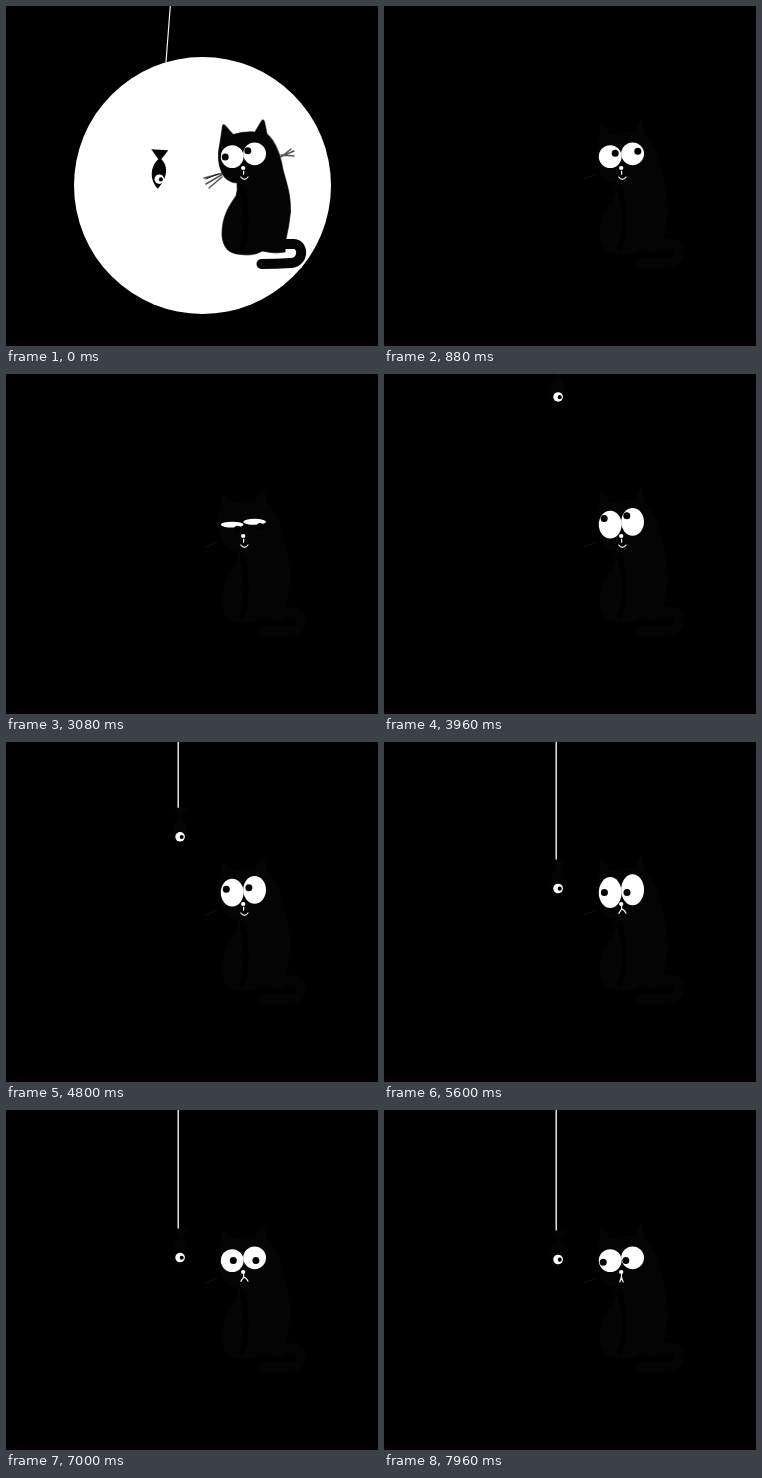
An HTML page with a canvas for the animation above (8 s loop, 372x340 px).

```html
<!DOCTYPE html>
<html lang="en">
<head>
<meta charset="utf-8">
<title>Cat in the dark</title>
<style>
  html, body { margin: 0; width: 100%; height: 100%; overflow: hidden; background: #000; }
  canvas { display: block; }
</style>
</head>
<body>
<canvas id="stage" width="372" height="340"></canvas>
<script>
const ctx = document.getElementById('stage').getContext('2d');
const LOOP = 8000, STEP = 40;
const SHADE = '#040404', PALE = '#f4f4f4';

const BLINKS = [640, 1800, 2920, 6280];
// Gaze relative to the point between the eyes; tilt lowers the left pupil and raises the right.
const LOOKS = [
  { from: 0, x: -6.9, y: -1.3, tilt: 3.2 },
  { from: 720, x: 5.1, y: -3, tilt: 1 },
  { from: 1240, x: -3.6, y: 4.4, tilt: 1.4 },
  { from: 2480, x: 5.4, y: 4.7, tilt: 1.4 },
  { from: 3600, x: -5.9, y: -6, tilt: 1.4 },
  { from: 4440, x: -5.7, y: 1.3, tilt: 0, time: 800 },
  { from: 6360, x: 1.2, y: 1.3, tilt: 0 },
  { from: 7240, x: -6.9, y: 2.2, tilt: 0.9 }
];

const BODY = new Path2D(`M214 137 L216.5 120 Q217.5 117 219.5 120 L227 128.5 Q238 125 249 126
  L255.5 115 Q257.5 112.5 258.5 116 L261 128 C270 136 275 151 277 164 C281 178 285 190 284.5 206
  Q283 220 280 233 L279 246 Q268 248 256 245 Q248 250 235 248.5 C223 248 217 242 216 229
  C216 210 223 200 230 190 Q232 184 231 177 Q220 176 216 167 C211 156 212 146 214 137 Z`);
const TAIL = new Path2D('M275 238 H288 C298 238.5 298 256 285 257 Q270 258 255.5 258');
const CHEST = new Path2D('M236 182 C241 200 242 225 236 242');
const WHISKERS = new Path2D(`M217 167 L198 172 M217 168 L200 178 M216 171 L203 182
  M274 151 L288 145 M275 149 L288 150 M275 151 L285 143`);
const FAINT_WHISKER = new Path2D('M212 168 L200 173');
const FISH = new Path2D(`M-8 -30 L9 -29 L2 -20 C8 -15 10 -3 -1.5 9.5
  C-11 -1 -8 -14 -1 -20 Z`);
const MOUTHS = {
  smile: new Path2D('M237.6 165 V168.2 M234.8 171 Q238.4 175.6 242 171'),
  frown: new Path2D('M237.6 163 V167 M234.8 171.3 L237.6 167.2 Q240 167.5 242 171.3'),
  small: new Path2D('M237.5 163 V167 M235.8 172 L237.4 167 L239.2 172 M236.6 169.6 H238.4')
};

const ramp = (t, from, to) => Math.min(1, Math.max(0, (t - from) / (to - from)));
const mix = (a, b, k) => a + (b - a) * k;

function oval(x, y, rx, ry, color) {
  ctx.fillStyle = color;
  ctx.beginPath();
  ctx.ellipse(x, y, rx, ry, 0, 0, Math.PI * 2);
  ctx.fill();
}

function fill(path, color) {
  ctx.fillStyle = color;
  ctx.fill(path);
}

function trace(path, color, width) {
  ctx.strokeStyle = color;
  ctx.lineWidth = width;
  ctx.stroke(path);
}

function line(x1, y1, x2, y2, width) {
  const path = new Path2D();
  path.moveTo(x1, y1);
  path.lineTo(x2, y2);
  trace(path, PALE, width);
}

// Origin is the middle of the eye.
function fish(x, y) {
  ctx.save();
  ctx.translate(x, y);
  fill(FISH, SHADE);
  oval(0, 0, 4.8, 4.8, '#fff');
  oval(1.6, 0.2, 2, 2.1, '#000');
  ctx.restore();
}

function spotlight(t) {
  const alpha = 1 - ramp(t, 0, 200);
  if (alpha === 0) return;
  ctx.globalAlpha = alpha;
  line(164.3, 0, 160, 56, 1.2);
  oval(196.5, 179.5, 128.5, 128.5, '#fff');
  fish(153.3, 173.2);
  trace(WHISKERS, '#555', 1.5);
  trace(BODY, '#666', 1.2);
  ctx.globalAlpha = 1;
}

function gaze(t) {
  const i = LOOKS.findLastIndex(look => look.from <= t);
  const next = LOOKS[i], last = LOOKS[Math.max(0, i - 1)];
  const k = ramp(t, next.from, next.from + (next.time || 2 * STEP));
  return {
    x: mix(last.x, next.x, k),
    y: mix(last.y, next.y, k),
    tilt: mix(last.tilt, next.tilt, k)
  };
}

function lid(t) {
  const start = BLINKS.find(b => t >= b && t < b + 6 * STEP);
  if (start === undefined) return 1;
  const phase = (t - start + STEP) / (7 * STEP);
  return Math.abs(1 - 2 * phase) ** 1.6;
}

function eyes(t) {
  const wide = 2.5 * ramp(t, 3640, 3840) + 1.6 * ramp(t, 5280, 5440) - 4.1 * ramp(t, 5800, 6000);
  const ry = (11.4 + wide) * lid(t);
  const look = gaze(t);
  for (const side of [-1, 1]) {
    oval(237.4 + side * 11.2, 149.2 - side * 1.4, 11.4, ry, '#fff');
    oval(237.4 + side * 11.3 + look.x, 149.2 - side * look.tilt + look.y, 3.5, 3.5, '#000');
  }
}

function cat(t) {
  fill(BODY, SHADE);
  trace(TAIL, SHADE, 10);
  trace(CHEST, '#000', 5);
  trace(FAINT_WHISKER, '#111', 1);
  eyes(t);
  oval(237.2, 162, 2.2, 2.1, '#fff');
  const mood = t < 4840 ? 'smile' : t < 7480 ? 'frown' : 'small';
  trace(MOUTHS[mood], PALE, 1.2);
}

// Steady drop, then a slowing one, then a gentle sag of the string.
function hangingFish(t) {
  if (t < 3600) return;
  const slow = 1 - (1 - ramp(t, 4400, 5600)) ** 1.5;
  const y = -3 + 54.5 * ramp(t, 3560, 4400) + 95 * slow + 3 * ramp(t, 5600, 7960) ** 2;
  fish(174.1, y);
  if (y > 29.5) line(172.2, 0, 172.2, y - 29.5, 1.4);
}

function draw(t) {
  ctx.fillStyle = '#000';
  ctx.fillRect(0, 0, 372, 340);
  ctx.fillStyle = '#070003';
  ctx.fillRect(0, 336, 372, 4);
  ctx.lineCap = 'round';
  ctx.lineJoin = 'round';
  spotlight(t);
  cat(t);
  hangingFish(t);
}

const begin = performance.now();
function frame() {
  const t = (performance.now() - begin) % LOOP;
  draw(Math.floor(t / STEP) * STEP);
  requestAnimationFrame(frame);
}
frame();
</script>
</body>
</html>
```
